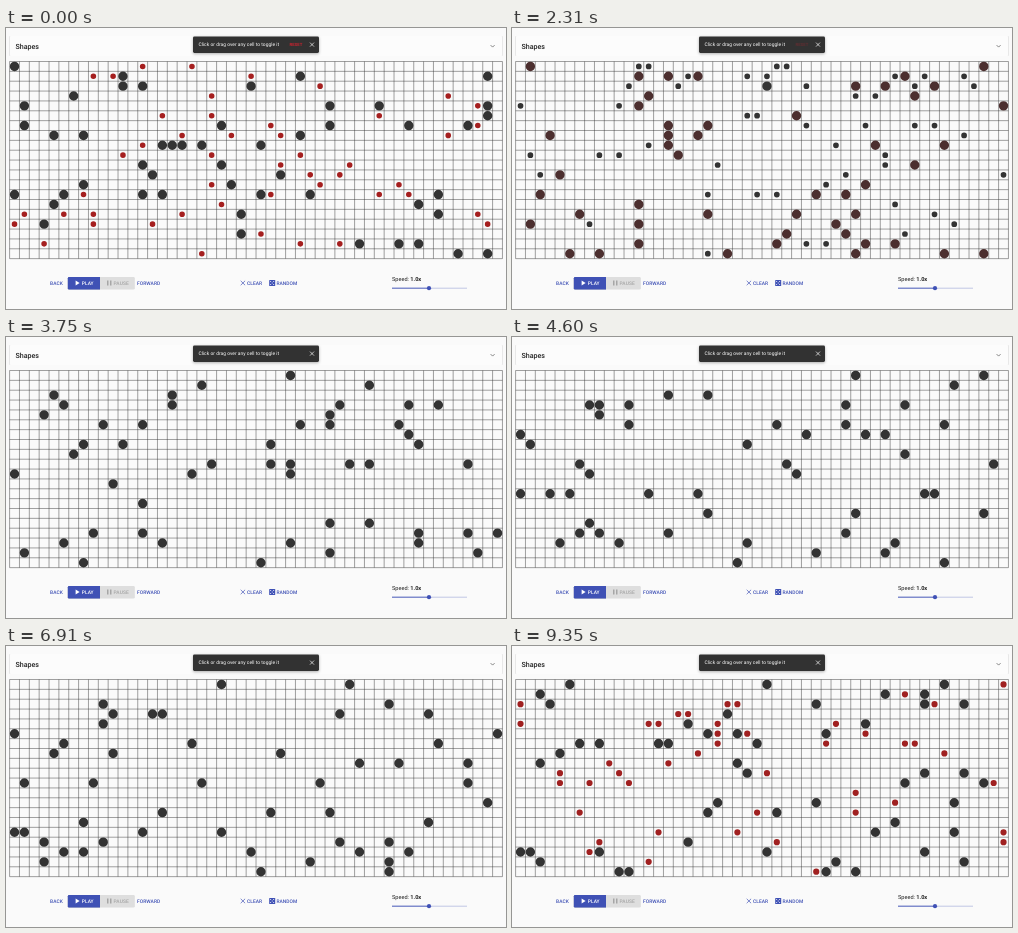
Recreate the animation shown at these times as an HTML page. Size 500 by 281 pixels, loop 9470 ms.

```html
<!DOCTYPE html>
<html lang="en">
<head>
<meta charset="utf-8">
<title>Cell board</title>
<style>
  html, body { margin: 0; width: 100%; height: 100%; overflow: hidden; background: #fafafa; }
  svg { display: block; width: 500px; height: 281px; }
  text { font-family: Roboto, sans-serif; text-rendering: geometricPrecision; }
  .btn { font-size: 4.9px; font-weight: 500; letter-spacing: .06px; fill: #3f51b5; }
  .panel { filter: drop-shadow(0 .5px .5px rgba(0, 0, 0, .3)); }
  .toast { filter: drop-shadow(0 1px 1.5px rgba(0, 0, 0, .3)); }
  .line { fill: none; stroke-width: .7; }
</style>
</head>
<body>
<svg viewBox="0 0 500 281">
  <rect width="500" height="281" fill="#fafafa"/>

  <rect class="panel" x="3.5" y="8" width="493" height="20" rx="1" fill="#fcfcfc"/>
  <text x="9.5" y="20.5" font-size="7.1" font-weight="500" fill="#222">Shapes</text>
  <path class="line" d="M484.6 17.1l2 2 2-2" stroke="#555"/>

  <path id="grid" fill="none" stroke="#333" stroke-opacity=".46"/>
  <path id="alive" fill="#333"/>
  <path id="born" fill="#333"/>
  <path id="dying"/>

  <rect class="toast" x="187" y="8.5" width="126" height="16.5" rx="1.4" fill="#323232"/>
  <text x="192.5" y="18.2" font-size="4.9" letter-spacing=".02" fill="#fff">Click or drag over any cell to toggle it</text>
  <text id="reset" x="283.5" y="18.2" font-size="4.3" font-weight="500" fill="#e0202f">RESET</text>
  <path class="line" d="M304 14.6l4 4m0-4l-4 4" stroke="#fff"/>

  <g class="btn">
    <path class="panel" d="M94 249v12.5h-31q-1.2 0-1.2-1.2v-10.1q0-1.2 1.2-1.2z"/>
    <path d="M94 249h33.6q1.2 0 1.2 1.2v10.1q0 1.2-1.2 1.2h-33.6z" fill="#dedede"/>
    <text x="44" y="256.7">BACK</text>
    <path d="M69.6 252.5v5l4-2.5z" fill="#fff"/>
    <text x="75.7" y="256.7" fill="#fff">PLAY</text>
    <path d="M101 252.6h1.5v4.8h-1.5zm3 0h1.5v4.8h-1.5z" fill="#a6a6a6"/>
    <text x="107.6" y="256.7" fill="#a6a6a6">PAUSE</text>
    <text x="131" y="256.7">FORWARD</text>
    <path class="line" d="M234.7 252.8l4.4 4.4m0-4.4l-4.4 4.4" stroke="#3f51b5"/>
    <text x="241" y="256.7">CLEAR</text>
    <rect x="263.2" y="252" width="6" height="6" rx=".6"/>
    <path d="M264.7 253.5h0m3 0h0m-1.5 1.5h0m-1.5 1.5h0m3 0h0" stroke="#fff" stroke-linecap="round"/>
    <text x="270.4" y="256.7">RANDOM</text>
  </g>

  <text x="386" y="253" font-size="5.6" fill="#222">Speed: <tspan font-weight="700">1.0x</tspan></text>
  <path d="M386 260.2h75" stroke="#b3bae0" stroke-width=".8"/>
  <path d="M386 260.2h37" stroke="#3f51b5" stroke-width=".8"/>
  <circle cx="423" cy="260.2" r="2.1" fill="#3f51b5"/>
</svg>

<script>
const LOOP = 9470, COLS = 50, ROWS = 20, CELLS = 50;
const STEP = 9.857, LEFT = 3.6, TOP = 33.5, R = 4.7;
const el = id => document.getElementById(id);

// Each generation replaces the previous board at its start time.
const starts = [-282, 680, 1290, 2250, 3220, 4190, 5260, 6180, 7100, 8010, 9080];

function seeded(seed) {
  let s = seed * 7919;
  return () => {
    s = (s + 0x6d2b79f5) | 0;
    let h = Math.imul(s ^ s >>> 15, s | 1);
    h ^= h + Math.imul(h ^ h >>> 7, h | 61);
    return ((h ^ h >>> 14) >>> 0) / 2 ** 32;
  };
}

function scatter(seed) {
  const random = seeded(seed), board = new Set();
  while (board.size < CELLS) board.add(Math.floor(random() * COLS * ROWS));
  return board;
}

const boards = Array.from({ length: starts.length + 1 }, (_, i) => scatter(i + 1));

function drawGrid() {
  let d = "";
  for (let c = 0; c <= COLS; c++) d += `M${LEFT + c * STEP} ${TOP}v${ROWS * STEP}`;
  for (let r = 0; r <= ROWS; r++) d += `M${LEFT} ${TOP + r * STEP}h${COLS * STEP}`;
  el("grid").setAttribute("d", d);
}

function discs(cells, r) {
  if (r <= 0) return "";
  return cells.map(i => {
    const x = LEFT + (i % COLS + .5) * STEP, y = TOP + (Math.floor(i / COLS) + .5) * STEP;
    return `M${x - r} ${y}a${r} ${r} 0 1 0 ${2 * r} 0a${r} ${r} 0 1 0 ${-2 * r} 0`;
  }).join("");
}

const clamp = v => Math.min(1, Math.max(0, v));
const mix = (a, b, k) => Math.round(a + (b - a) * k);

function draw(t) {
  const n = starts.findLastIndex(start => start <= t);
  const age = t - starts[n], old = boards[n], now = boards[n + 1];
  const kept = [...now].filter(i => old.has(i));
  const fresh = [...now].filter(i => !old.has(i));
  const gone = [...old].filter(i => !now.has(i));

  el("alive").setAttribute("d", discs(kept, R));
  el("born").setAttribute("d", discs(fresh, 2.7 + 2 * clamp(age / 260) ** 1.7));

  // Dying cells redden at full size, then shrink away.
  const heat = clamp(age / 300), dim = mix(51, 30, heat);
  el("dying").setAttribute("d", discs(gone, R * (1 - clamp((age - 210) / 180))));
  el("dying").setAttribute("fill", `rgb(${mix(51, 172, heat)},${dim},${dim})`);

  el("reset").setAttribute("opacity", t < 730 ? 1 : t < 2310 ? .6 : t < 2430 ? .3 : 0);
}

drawGrid();
const begin = performance.now();
function tick() {
  draw((performance.now() - begin) % LOOP);
  requestAnimationFrame(tick);
}
tick();
</script>
</body>
</html>
```
